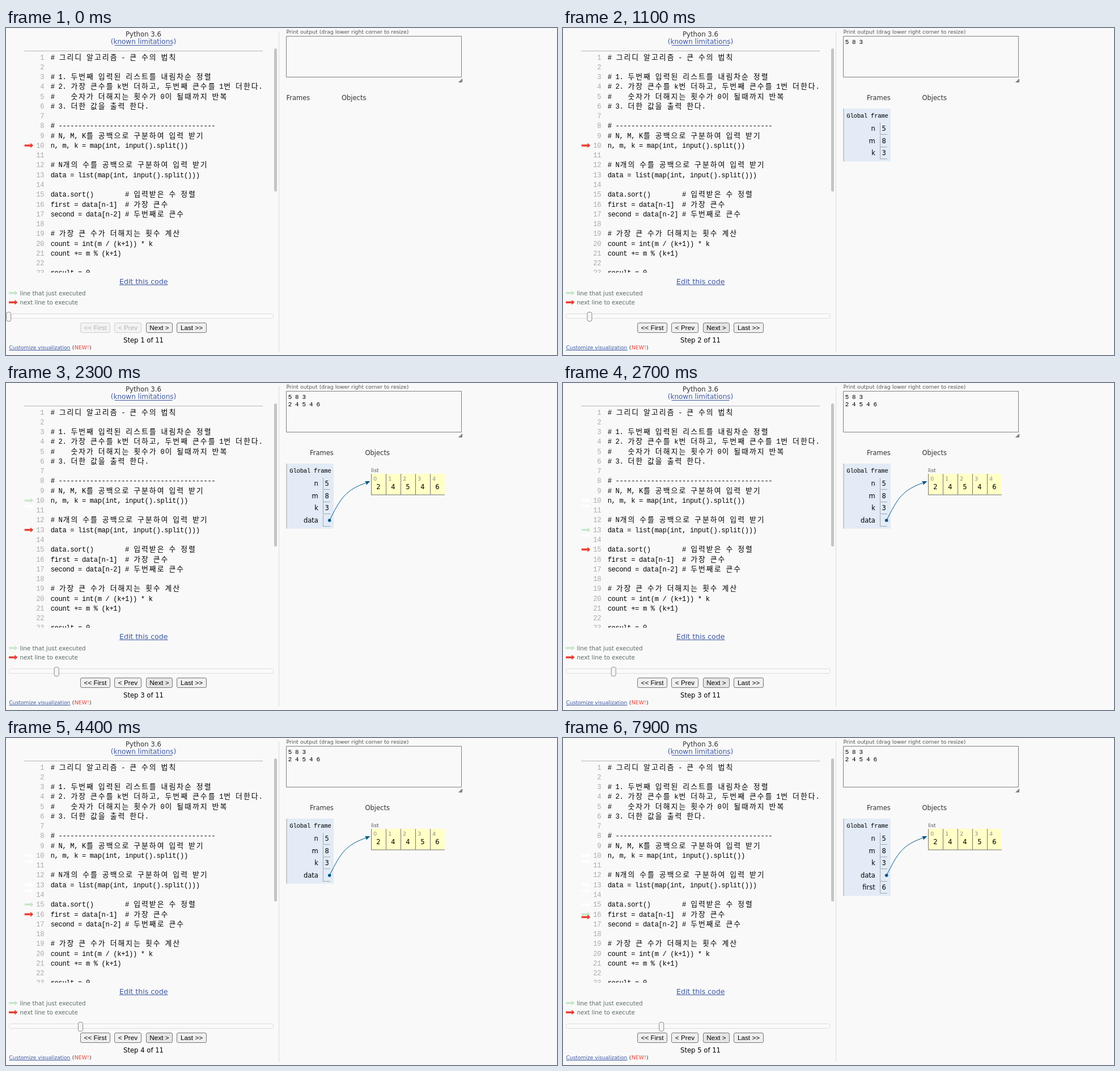
An HTML page with a canvas that plays this animation: 972 by 576 pixels, repeating every 8000 ms.

```html
<!DOCTYPE html>
<html lang="ko">
<head>
<meta charset="utf-8">
<title>Step through code</title>
<style>
html, body { margin: 0; width: 100%; height: 100%; overflow: hidden; background: #f9f9f9; }
canvas { display: block; width: 972px; height: 576px; }
</style>
</head>
<body>
<canvas id="stage" width="972" height="576"></canvas>
<script>
const ctx = document.getElementById('stage').getContext('2d');
const LOOP = 8000, TICK = 100;
const BG = '#f9f9f9', RED = '#e93f34', GREEN = '#c9e6ca', LINK = '#3d58a2', INK = '#005583';
const UI = '"DejaVu Sans", sans-serif';
const BUTTON = '"Liberation Sans", sans-serif';
const MONO = '"Liberation Mono", monospace';
const HANGUL = '"Noto Sans Mono CJK KR", "Noto Sans CJK KR", "Noto Sans CJK", sans-serif';

const CODE = `# 그리디 알고리즘 - 큰 수의 법칙

# 1. 두번째 입력된 리스트를 내림차순 정렬
# 2. 가장 큰수를 k번 더하고, 두번째 큰수를 1번 더한다.
#    숫자가 더해지는 횟수가 0이 될때까지 반복
# 3. 더한 값을 출력 한다.

# ----------------------------------------
# N, M, K를 공백으로 구분하여 입력 받기
n, m, k = map(int, input().split())

# N개의 수를 공백으로 구분하여 입력 받기
data = list(map(int, input().split()))

data.sort()        # 입력받은 수 정렬
first = data[n-1]  # 가장 큰수
second = data[n-2] # 두번째로 큰수

# 가장 큰 수가 더해지는 횟수 계산
count = int(m / (k+1)) * k
count += m % (k+1)

result = 0`.split('\n');

// Each press of Next: when, and how far the arrow gets on its first tick.
const PRESSES = [
  { at: 1000, ease: 0.2 },
  { at: 2200, ease: 0.29 },
  { at: 3900, ease: 0.28 },
  { at: 7600, ease: 0.28 }
];
const STOPS = [10, 13, 15, 16, 17];
const lineY = n => 51.5 + (n - 1) * 17.27;

function text(s, x, y, size, color = '#000', align = 'left', family = UI) {
  ctx.font = size + 'px ' + family;
  ctx.fillStyle = color;
  ctx.textAlign = align;
  ctx.fillText(s, x, Math.round(y));
}

// Terminal-style cells: Hangul takes two columns.
function cells(s, x, y, pitch, color = '#000') {
  for (const ch of s) {
    const wide = ch >= '가';
    const w = wide ? 2 * pitch : pitch;
    text(ch, x + w / 2, y, pitch * (wide ? 1.85 : 1.75), color, 'center', wide ? HANGUL : MONO);
    x += w;
  }
}

function rect(x, y, w, h, color) {
  ctx.fillStyle = color;
  ctx.fillRect(x, y, w, h);
}

function box(x, y, w, h, r, fill, stroke) {
  ctx.beginPath();
  ctx.roundRect(x + 0.5, y + 0.5, w - 1, h - 1, r);
  ctx.fillStyle = fill;
  ctx.fill();
  ctx.strokeStyle = stroke;
  ctx.lineWidth = 1;
  ctx.stroke();
}

function poly(points, color) {
  ctx.beginPath();
  points.forEach(p => ctx.lineTo(p[0], p[1]));
  ctx.fillStyle = color;
  ctx.fill();
}

function arrow(x, y, color) {
  const shape = [[0, 3], [12, 3], [12, 0], [18, 5], [12, 10], [12, 7], [0, 7]];
  poly(shape.map(([px, py]) => [x + px * 0.87, y + (py - 5) * 0.87]), color);
}

function drawCode() {
  rect(32, 40, 421, 1, '#b4b4b4');
  ctx.save();
  ctx.beginPath();
  ctx.rect(0, 41, 472, 390);
  ctx.clip();
  CODE.forEach((s, i) => {
    const y = lineY(i + 1) + 4;
    const num = String(i + 1);
    cells(num, 67.3 - num.length * 6.92, y, 6.92, '#aaa');
    cells(s, 78.8, y, 6.92);
  });
  ctx.restore();
  ctx.beginPath();
  ctx.roundRect(473, 36, 5, 252, 2.5);
  ctx.fillStyle = '#c4c4c4';
  ctx.fill();
}

function drawArrows(t) {
  const marks = [];
  let red = lineY(STOPS[0]), green = null;
  PRESSES.forEach((p, i) => {
    const dt = t - p.at;
    if (dt < 200) return;
    const from = lineY(STOPS[i]), gap = lineY(STOPS[i + 1]) - from;
    const k = dt < 300 ? 0 : dt < 400 ? p.ease : dt < 500 ? 0.97 : 1;
    if (green !== null) marks.push(green);
    if (dt >= 400 && gap > 20) marks.push(from + gap * p.ease);
    green = from;
    red = from + gap * k;
  });
  marks.forEach(y => arrow(32.7, y, '#fff'));
  if (green !== null && green !== red) arrow(32.7, green, GREEN);
  arrow(32.7, red, RED);
}

function drawControls(step, nextFill) {
  text('Edit this code', 242.7, 451, 12.55, LINK, 'center');
  rect(200, 452, 85.5, 1, LINK);
  arrow(5, 466.8, GREEN);
  text('line that just executed', 24.5, 471, 10.37, '#5e6a6a');
  arrow(5, 483.2, RED);
  text('next line to execute', 24.5, 487, 10.3, '#5e6a6a');

  box(5, 503, 467, 9, 3, '#fafafa', '#ddd');
  box(0.2 + 42.25 * (step - 1), 500, 9, 17, 3, '#f6f6f6', '#888');

  [['<< First', 131, 53], ['< Prev', 191, 48], ['Next >', 247, 47], ['Last >>', 301, 53]]
    .forEach(([label, x, w], i) => {
      const off = step === 1 && i < 2;
      const fill = i === 2 ? nextFill : off ? '#f3f3f3' : '#efefef';
      box(x, 519, w, 18, 2.5, fill, off ? '#cfcfcf' : '#767676');
      text(label, x + w / 2, 532, 11.75, off ? '#b2b2b2' : '#000', 'center', BUTTON);
    });
  text('Step ' + step + ' of 11', 242.5, 554, 11.63, '#000', 'center');

  text('Customize visualization', 5.5, 566, 9.14, LINK);
  rect(5.5, 567, 108, 1, LINK);
  text('(', 116.8, 566, 9.4, '#333');
  text('NEW!', 120.7, 566, 9.4, RED);
  text(')', 147, 566, 9.4, '#333');
}

function drawFrame(vars) {
  const h = 93 + 21.5 * (vars.length - 3);
  rect(495, 142, 83, h, '#e2ebf6');
  rect(494.5, 142, 1, h, '#a0a0a0');
  cells('Global frame', 500.5, 158, 6.1);
  vars.forEach(([name, value], i) => {
    const y = 181.2 + 21.55 * i;
    text(name, 550.8, y, 11.5, '#000', 'right');
    rect(559, Math.round(y - 14), 1, 20, '#a0aab0');
    rect(559, Math.round(y + 6), 13, 1, '#a0aab0');
    text(value, 566.2, y, 11.5, '#000', 'center');
  });
}

function drawList(values) {
  text('list', 644, 157, 9.4, '#555');
  rect(644, 160, 130, 37, '#ffffc6');
  values.forEach((v, i) => {
    const x = 644 + Math.round(25.9 * i);
    rect(x, 160, 1, 37, '#777');
    text(i, x + 4.3, 172, 9.3, '#8a8a8a');
    text(v, x + 13, 187, 11.5, '#000', 'center');
  });
  rect(644, 196.5, 130, 1, '#777');

  ctx.beginPath();
  ctx.arc(570.7, 242, 2.8, 0, 7);
  ctx.fillStyle = INK;
  ctx.fill();
  ctx.beginPath();
  ctx.moveTo(570.7, 242);
  ctx.bezierCurveTo(590, 204, 598, 188, 638, 175);
  ctx.strokeStyle = INK;
  ctx.lineWidth = 1;
  ctx.stroke();
  poly([[642.5, 173], [632.8, 173], [635.5, 175.8], [635.5, 179.8]], INK);
}

function drawOutput(step) {
  text('Print output (drag lower right corner to resize)', 494.5, 10, 9.33, '#555');
  box(494, 14, 310, 73, 0, BG, '#808080');
  if (step > 1) cells('5 8 3', 497.8, 28, 6.22);
  if (step > 2) cells('2 4 5 4 6', 497.8, 41, 6.22);
  poly([[798.5, 96], [805, 89.5], [805, 96]], '#999');
  ctx.strokeStyle = '#555';
  ctx.lineWidth = 1;
  ctx.beginPath();
  for (const d of [0, 3]) {
    ctx.moveTo(798.5 + d, 96);
    ctx.lineTo(805, 89.5 + d);
  }
  ctx.stroke();
}

function draw(t) {
  const step = 1 + PRESSES.filter(p => t >= p.at + 100).length;
  const pressed = PRESSES.some(p => t >= p.at && t < p.at + 100);
  const nextFill = pressed ? '#f5f5f5' : t >= 500 ? '#e5e5e5' : '#efefef';

  rect(0, 0, 972, 576, BG);
  rect(481, 6, 1, 564, '#ddd');
  text('Python 3.6', 242.5, 15, 11.72, '#333', 'center');
  text('(known limitations)', 242.5, 28, 12, LINK, 'center');
  rect(191.5, 30, 102, 1, LINK);
  drawCode();
  drawArrows(t);
  drawControls(step, nextFill);
  drawOutput(step);

  const shift = step > 1 ? 41.5 : 0;
  text('Frames', 494.5 + shift, 127, 11.5, '#333');
  text('Objects', 592 + shift, 127, 11.5, '#333');
  if (step > 1) {
    const vars = [['n', '5'], ['m', '8'], ['k', '3'], ['data', ''], ['first', '6']];
    drawFrame(vars.slice(0, step < 3 ? 3 : step < 5 ? 4 : 5));
  }
  if (step > 2) drawList(step > 3 ? [2, 4, 4, 5, 6] : [2, 4, 5, 4, 6]);
}

let start = null, shown = -1;
function loop(now) {
  if (start === null) start = now;
  const t = Math.floor((now - start) % LOOP / TICK) * TICK;
  if (t !== shown) draw(shown = t);
  requestAnimationFrame(loop);
}
requestAnimationFrame(loop);
</script>
</body>
</html>
```
